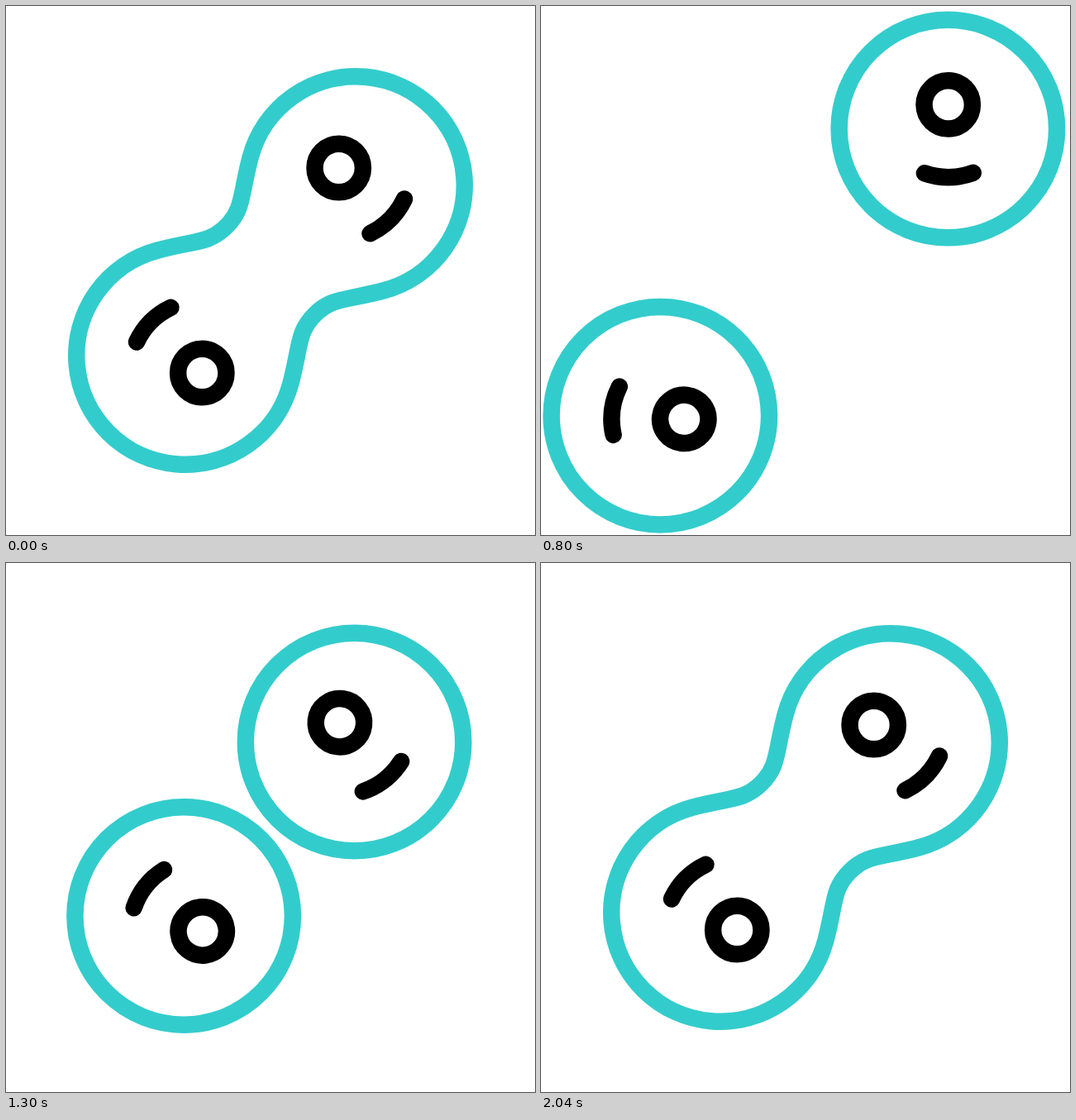
An HTML page that plays this animation: 640 px wide and 640 px high, repeating every 2.4 s.

```html
<!DOCTYPE html>
<html lang="en">
<head>
<meta charset="utf-8">
<title>Cell division</title>
<style>
  html, body { margin: 0; width: 100%; height: 100%; overflow: hidden; background: #fff; }
  svg { display: block; width: 100vw; height: 100vh; }
  g, path, circle { fill: none; stroke-width: 20.5; stroke-linecap: round; stroke-linejoin: round; }
  .membrane { stroke: #33cccc; }
  .core { stroke: #000; }
</style>
</head>
<body>
<svg viewBox="0 0 640 640">
  <path id="outline" class="membrane"/>
  <path id="burst" class="membrane"/>
  <g id="upper" class="core"><circle cx="-20.3" cy="-21" r="29.2"/><path d="M59 16.5A88 88 0 0 1 17.5 58.2"/></g>
  <g id="lower" class="core"><circle cx="-20.3" cy="-21" r="29.2"/><path d="M59 16.5A88 88 0 0 1 17.5 58.2"/></g>
</svg>
<script>
const LOOP = 2400, RADIUS = 131.75, SPLIT = 580, JOIN = 1390;
const RAD = Math.PI / 180;
const $ = id => document.getElementById(id);

// Each key: time, x, y (from the stage centre), spin in degrees
const UPPER = [[0, 103, -103, 0], [590, 135, -142, 0], [765, 173, -172, 45], [1478, 88.5, -91, 0], [2040, 103, -103, 0]];
const LOWER = [[0, -103, 103, 0], [590, -138, 145, 0], [775, -176, 176, -38], [1490, -90, 92.5, 0], [2040, -103, 103, 0]];
// Each key: time, contact angle, neck half-width, handle at the lobe, handle at the neck
const NECK = [[0, 60, 75.5, 48, 30], [590, 60, 18, 78, 39], [JOIN, 8, 6, 4, 1], [1480, 22, 41, 9, 2], [2040, 60, 75.5, 48, 30]];

const progress = (t, from, to) => Math.min(1, Math.max(0, (t - from) / (to - from)));
const ease = u => u * u * (3 - 2 * u);

function sample(keys, t) {
  let i = 0;
  while (i < keys.length - 2 && t >= keys[i + 1][0]) i++;
  const [a, b] = [keys[i], keys[i + 1]];
  const k = ease(progress(t, a[0], b[0]));
  return a.slice(1).map((v, j) => v + (b[j + 1] - v) * k);
}

const fmt = (x, y) => x.toFixed(2) + ' ' + y.toFixed(2);

function circlePath([x, y]) {
  const arc = `A${RADIUS} ${RADIUS} 0 1 1 `;
  return 'M' + fmt(x - RADIUS, y) + arc + fmt(x + RADIUS, y) + arc + fmt(x - RADIUS, y) + 'Z';
}

// Two lobes joined by a neck, built along the axis between the centres
function joinedPath(a, b, t) {
  const [angle, width, lobeHandle, neckHandle] = sample(NECK, t);
  const mx = (a[0] + b[0]) / 2, my = (a[1] + b[1]) / 2;
  const dx = a[0] - mx, dy = a[1] - my, half = Math.hypot(dx, dy);
  const ex = dx / half, ey = dy / half;
  const lag = 3 * Math.sin(Math.PI * progress(t, 0, 590));
  const at = (u, v) => fmt(mx + ex * u + ey * v, my + ey * u - ex * v);
  const sin = Math.sin(angle * RAD), cos = Math.cos(angle * RAD);
  const pu = half - lag - RADIUS * cos, pv = RADIUS * sin;
  const cu = pu - lobeHandle * sin, cv = pv - lobeHandle * cos;
  const side = s =>
    `C${at(s * cu, s * cv)} ${at(s * neckHandle, s * width)} ${at(0, s * width)}` +
    `C${at(-s * neckHandle, s * width)} ${at(-s * cu, s * cv)} ${at(-s * pu, s * pv)}`;
  const arc = `A${RADIUS} ${RADIUS} 0 1 0 `;
  return 'M' + at(pu, pv) + side(1) + arc + at(-pu, -pv) + side(-1) + arc + at(pu, pv) + 'Z';
}

function burstPath(t) {
  const head = 22 + 46 * ease(progress(t, 570, 665));
  const tail = 22 + 46 * ease(progress(t, 590, 720));
  if (head - tail < 0.5) return '';
  const rays = [[-92, -2], [-138, -4], [175.5, 4]];
  const fan = (x, y, turn, shift) => rays.map(([deg, offset]) => {
    const c = Math.cos((deg + turn) * RAD), s = Math.sin((deg + turn) * RAD);
    const r0 = tail + offset + shift, r1 = head + offset + shift;
    return 'M' + fmt(x + c * r0, y + s * r0) + 'L' + fmt(x + c * r1, y + s * r1);
  }).join('');
  return fan(297, 298, 0, 0) + fan(355, 376, 180, 3);
}

function draw(t) {
  const place = ([x, y]) => [320 + x, 320 + y];
  const up = sample(UPPER, t), low = sample(LOWER, t);
  const a = place(up), b = place(low);
  const apart = t >= SPLIT && t < JOIN;
  $('outline').setAttribute('d', apart ? circlePath(a) + circlePath(b) : joinedPath(a, b, t));
  $('burst').setAttribute('d', burstPath(t));
  $('upper').setAttribute('transform', `translate(${fmt(...a)}) rotate(${up[2]})`);
  $('lower').setAttribute('transform', `translate(${fmt(...b)}) rotate(${180 + low[2]})`);
}

const start = performance.now();
function tick() {
  draw((performance.now() - start) % LOOP);
  requestAnimationFrame(tick);
}
tick();
</script>
</body>
</html>
```
